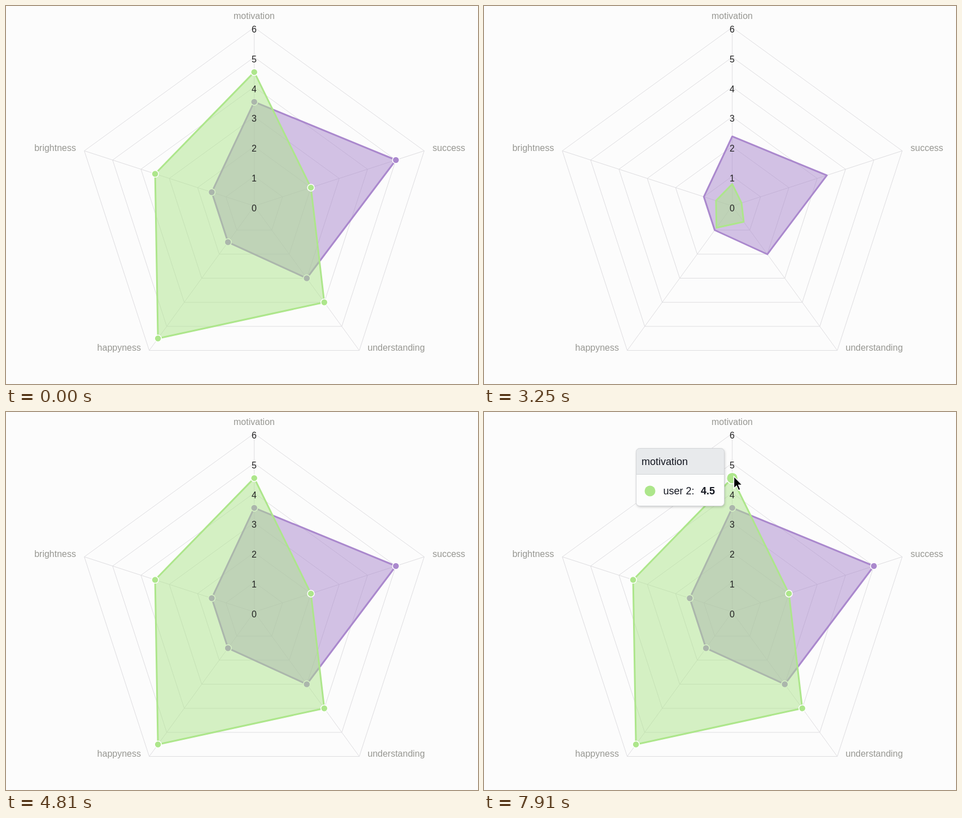
Recreate the animation shown at these times as an HTML page. Size 836 px wide and 670 px high, loop 8000 ms.

```html
<!DOCTYPE html>
<html lang="en">
<head>
<meta charset="utf-8">
<title>Radar chart</title>
<style>
  html, body { margin: 0; height: 100%; overflow: hidden; background: #fcfcfc; }
  svg { display: block; width: 100vw; height: 100vh; font: 16px "Liberation Sans", Arial, sans-serif; }
  .grid { fill: none; stroke: #dedde0; }
  .label { fill: #979792; }
  .tick { fill: #222; text-anchor: middle; }
  .area { fill-opacity: .5; stroke-width: 3; stroke-linejoin: round; }
  .dots { stroke: #fff; stroke-width: 1.5; }
  #tip { font-size: 18px; fill: #12151f; }
  #tip .box { fill: #fdfdfd; filter: drop-shadow(1px 2px 2px #0003); }
</style>
</head>
<body>
<svg id="stage" viewBox="0 0 836 670">
  <g id="chart"></g>
  <g id="tip">
    <rect class="box" x="269.5" y="64.5" width="156" height="102" rx="6"/>
    <path d="M269.5 111V70.5a6 6 0 0 1 6-6h144a6 6 0 0 1 6 6V111z" fill="#e8eaec"/>
    <path d="M269.5 110.5h156" stroke="#d3d5d8"/>
    <rect x="269.5" y="64.5" width="156" height="102" rx="6" fill="none" stroke="#d3d5d8"/>
    <text x="279" y="94">motivation</text>
    <circle cx="294" cy="140" r="9.5" fill="#ade68b"/>
    <text x="317.5" y="146">user 2:</text>
    <text x="384" y="146" font-weight="bold">4.5</text>
  </g>
  <path id="cursor" d="M0 0V21.5L4.8 17 8.2 25 11.8 23.4 8.4 15.6H15Z" stroke="#fff" stroke-width="1.5"/>
</svg>
<script>
const LOOP = 8000, CX = 439.7, CY = 354.5, UNIT = 52.75;
const RESET = 2115, GROW = 1668, DOTS_AT = 3810;
const series = [
  { color: '#aa88cd', values: [3.5, 5, 3, 1.5, 1.5], start: 2137 },
  { color: '#ade68b', values: [4.5, 2, 4, 5.5, 3.5], start: 2978 }
];
const labels = [
  ['motivation', 439.5, 23, 'middle'],
  ['success', 755.5, 256.5, 'start'],
  ['understanding', 640.5, 610.5, 'start'],
  ['happyness', 239, 610.5, 'end'],
  ['brightness', 124, 256.5, 'end']
];
const $ = id => document.getElementById(id);
const chart = $('chart'), tip = $('tip'), cursor = $('cursor');

function add(parent, tag, attrs, text) {
  const el = document.createElementNS('http://www.w3.org/2000/svg', tag);
  for (const key in attrs) el.setAttribute(key, attrs[key]);
  if (text !== undefined) el.textContent = text;
  return parent.appendChild(el);
}
function point(value, i) {
  const a = i * Math.PI * 2 / 5;
  return [CX + value * UNIT * Math.sin(a), CY - value * UNIT * Math.cos(a)];
}
const polygon = values => values.map(point).join(' ');
const clamp = x => Math.max(0, Math.min(1, x));
const progress = (t, from, duration) => clamp((t - from) / duration);
const smooth = x => x * x * (3 - 2 * x);

for (let n = 1; n <= 6; n++)
  add(chart, 'polygon', { class: 'grid', points: polygon(Array(5).fill(n)) });
for (let i = 0; i < 5; i++)
  add(chart, 'polyline', { class: 'grid', points: [[CX, CY], point(6, i)].join(' ') });
for (const [text, x, y, anchor] of labels)
  add(chart, 'text', { class: 'label', x, y, 'text-anchor': anchor }, text);
for (const s of series) {
  s.area = add(chart, 'polygon', { class: 'area', fill: s.color, stroke: s.color });
  s.dots = add(chart, 'g', { class: 'dots', fill: s.color });
  s.values.forEach((v, i) => {
    const [cx, cy] = point(v, i);
    add(s.dots, 'circle', { cx, cy, r: 6 });
  });
}
for (let n = 0; n <= 6; n++)
  add(chart, 'text', { class: 'tick', x: 439.5, y: CY + 9 - n * UNIT }, n);
const hoverDot = series[1].dots.firstChild;

function draw(t) {
  const fresh = t < RESET;
  for (const s of series) {
    const k = fresh ? 1 : progress(t, s.start, GROW);
    s.area.setAttribute('points', polygon(s.values.map(v => v * k)));
    s.area.setAttribute('visibility', k ? 'visible' : 'hidden');
    s.dots.setAttribute('opacity', fresh ? 1 : progress(t, DOTS_AT, 150));
  }
  // The pointer drops in from the top, pauses, then moves onto the first dot.
  const drop = smooth(progress(t, 6400, 450));
  const slide = smooth(progress(t, 6950, 400));
  const x = 446 - 20 * drop + 16.5 * slide;
  const y = -30 + 147 * drop - 3 * slide;
  cursor.setAttribute('transform', `translate(${x} ${y})`);
  const hover = progress(t, 7170, 150);
  hoverDot.setAttribute('r', 6 + 4 * hover);
  tip.setAttribute('opacity', hover);
}
const begin = performance.now();
function frame() {
  draw((performance.now() - begin) % LOOP);
  requestAnimationFrame(frame);
}
frame();
</script>
</body>
</html>
```
